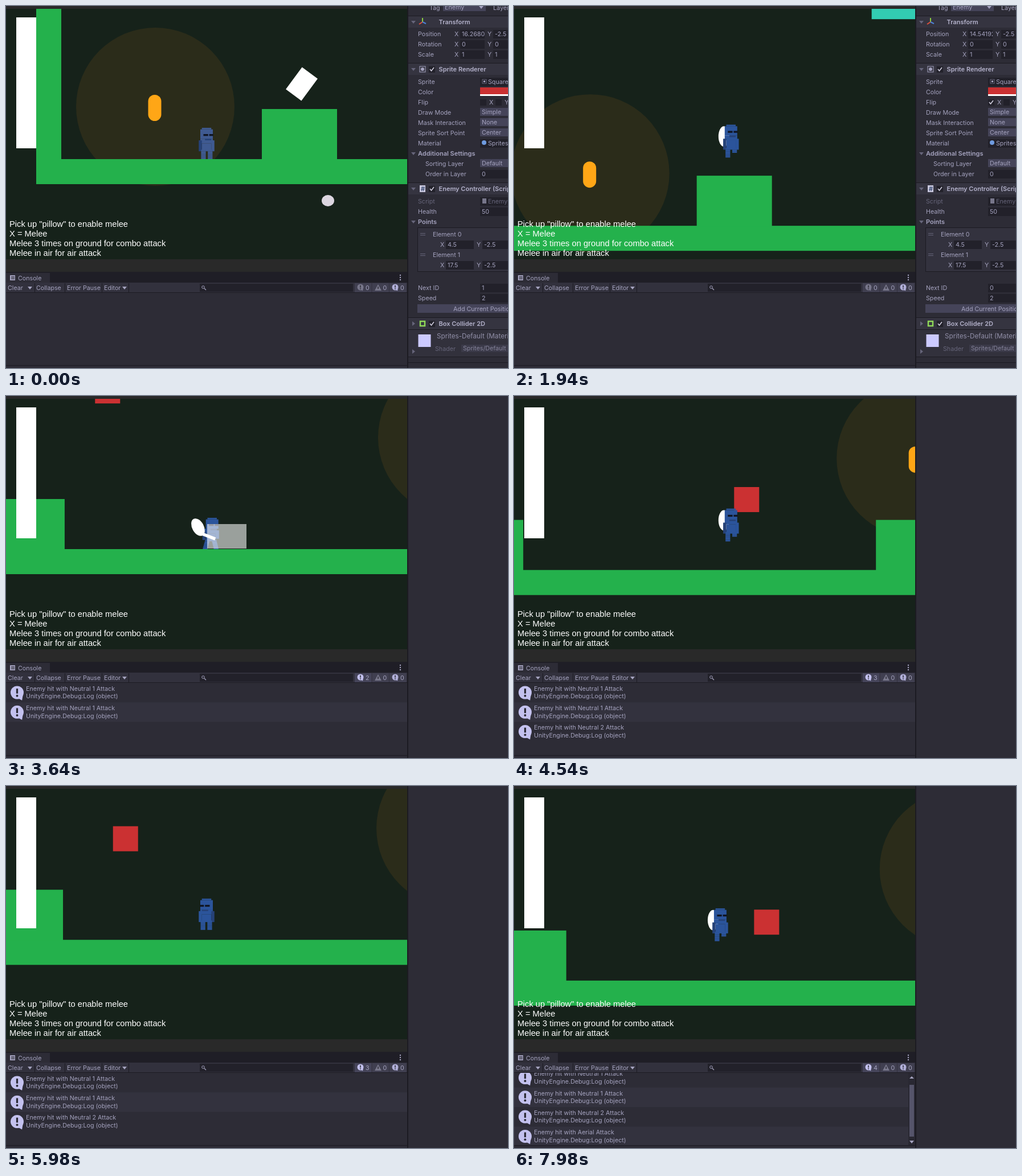
An HTML page with a canvas for the animation above (8000 ms loop, 881x636 px).

```html
<!DOCTYPE html>
<html lang="en">
<head>
<meta charset="utf-8">
<title>Melee test scene</title>
<style>
html, body { margin: 0; width: 100%; height: 100%; overflow: hidden; background: #2d2c36; }
canvas { display: block; }
</style>
</head>
<body>
<canvas id="stage" width="881" height="636"></canvas>
<script>
const ctx = document.getElementById('stage').getContext('2d');
const LOOP = 8000, UNIT = 44, PIXEL = 2.75;
const UI = '10.7px Inter, sans-serif', UI_BOLD = '600 11px Inter, sans-serif';
const PANEL = '#2d2c36', EDGE = '#1c1b22', FIELD = '#22212a', BUTTON = '#454459';
const LABEL = '#a5a3bf', DIM = '#66657a', LIGHT = '#c3c1ee', GREEN = '#24b14c', RED = '#cb3132';

const RUN_SPEED = 0.32, LAG_X = 90, LAG_Y = 40;
const runs = [
  { from: 1450, to: 2944, dir: 1 }, { from: 4180, to: 4830, dir: 1 }, { from: 5125, to: 5766, dir: -1 },
  { from: 6795, to: 6905, dir: 1 }, { from: 7200, to: 7284, dir: -1 }, { from: 7950, to: 8000, dir: 1 },
];
const jumps = [{ start: 1437, height: 122 }, { start: 4406, height: 122 }, { start: 5938, height: 122 }, { start: 7374, height: 77 }];
const hits = [{ time: 3250, name: 'Neutral 1' }, { time: 3600, name: 'Neutral 1' }, { time: 3920, name: 'Neutral 2' }, { time: 6920, name: 'Aerial' }];
const TURN = 534, PICKUP = 1880, DEATH = 3600;

const clamp = (v, lo, hi) => Math.min(hi, Math.max(lo, v));
const travelled = t => runs.reduce((sum, r) => sum + r.dir * RUN_SPEED * clamp(t - r.from, 0, r.to - r.from), 0);
const altitude = t => jumps.reduce((sum, j) => {
  const u = clamp((t - j.start) / (105 * Math.sqrt(j.height)), 0, 1);
  return sum + 4 * j.height * u * (1 - u);
}, 0);
const enemyX = t => 17.32075 - 1.975 * Math.abs(t - TURN) / 1000;
// The hanging box sweeps back and forth at a constant angular speed.
function swingAngle(t) {
  const phase = (1.561 * t / 1000 + 2.3) % 4;
  return 88 * (Math.abs(phase - 2) - 1) * Math.PI / 180;
}

function rect(x, y, w, h, color) {
  ctx.fillStyle = color;
  ctx.fillRect(x, y, w, h);
}
function ellipse(x, y, rx, ry, color, angle = 0) {
  ctx.fillStyle = color;
  ctx.beginPath();
  ctx.ellipse(x, y, rx, ry, angle, 0, 7);
  ctx.fill();
}
const disc = (x, y, r, color) => ellipse(x, y, r, r, color);
function poly(points, color) {
  ctx.fillStyle = color;
  ctx.beginPath();
  points.forEach(p => ctx.lineTo(p[0], p[1]));
  ctx.fill();
}
function line(points, color, width = 1) {
  ctx.strokeStyle = color;
  ctx.lineWidth = width;
  ctx.beginPath();
  points.forEach(p => ctx.lineTo(p[0], p[1]));
  ctx.stroke();
}
function arc(x, y, r, end, color, width = 1) {
  ctx.strokeStyle = color;
  ctx.lineWidth = width;
  ctx.beginPath();
  ctx.arc(x, y, r, 0, end);
  ctx.stroke();
}
function outline(x, y, size, color, width = 1) {
  ctx.strokeStyle = color;
  ctx.lineWidth = width;
  ctx.strokeRect(x, y, size, size);
}
function text(s, x, y, color = LABEL, font = UI) {
  ctx.font = font;
  ctx.fillStyle = color;
  ctx.textBaseline = 'middle';
  ctx.fillText(s, x, y + 0.5);
}
function clipped(x, y, w, h, draw) {
  ctx.save();
  ctx.beginPath();
  ctx.rect(x, y, w, h);
  ctx.clip();
  draw();
  ctx.restore();
}
const arrowDown = (x, y, color = LABEL) => poly([[x - 4, y - 2], [x + 4, y - 2], [x, y + 3]], color);
const arrowRight = (x, y, color) => poly([[x - 2, y - 4], [x + 3, y], [x - 2, y + 4]], color);

// Drawn in sprite pixels with the origin between the feet, facing right.
function drawBody(color, lean, stride, airborne) {
  const dark = '#264278', eye = '#101522', top = airborne ? -21 : -20;
  rect(lean - 3, top, 6, 1, color);
  rect(lean - 4, top + 1, 8, 6, color);
  rect(lean - 2, top + 4, 3, 1.2, eye);
  rect(lean + 1.7, top + 4, 2.6, 1.2, eye);
  rect(-4, top + 7, 8, 3, color);
  rect(-3, top + 10, 6, -top - 15, color);
  rect(lean - 1, top + 7, 4, 1, dark);
  rect(-5 - stride / 2, -12, 2, 7 - 2 * stride, dark);
  rect(3, -12, 2 + stride, 7 - 4 * stride, color);
  for (let row = 0; row < 6; row++) {
    rect(-3.5 - stride * row * 0.7, row - 6, 3, 1, color);
    if (row < 3 || !airborne) rect(0.8 + stride * row * 0.6, row - 6, 3, 1, color);
  }
}

function drawPlayer(t, x, feet, airborne) {
  const attacking = hits.some(h => Math.abs(t - h.time - 15) < 100);
  const running = !airborne && runs.some(r => t > r.from && t < r.to);
  const lastRun = runs.filter(r => t >= r.from).pop();
  const stride = running ? Math.abs(Math.cos(t * Math.PI / 370)) : attacking ? 0.4 : 0;
  if (attacking) airborne ? feet -= 16 : x += 7;

  const inSprite = draw => {
    ctx.save();
    ctx.translate(x, feet);
    ctx.scale(lastRun ? PIXEL * lastRun.dir : PIXEL, PIXEL);
    draw();
    ctx.restore();
  };
  inSprite(() => {
    if (airborne && !attacking && t > PICKUP) ellipse(-4.5, -13.5, 3.5, 6.5, '#fff');
    if (airborne && attacking) ctx.translate(0, 3);
    drawBody(lastRun ? '#2b549b' : '#3f5a91', running || attacking ? 1 : 0, stride, airborne);
    if (attacking && !airborne) {
      ellipse(-8, -14, 3.7, 6, '#fff', -0.5);
      line([[-6, -10], [3, -6.5]], '#fff', 2);
    }
  });
  if (!attacking) return;
  const hitbox = airborne ? [x + 2, feet - 47, 72, 77] : [x - 6, feet - 44, 69, 43];
  rect(...hitbox, 'rgba(255,255,255,.57)');
  if (airborne) inSprite(() => arc(7.2, -5, 4.6, Math.PI * 0.95, '#fff', 3.5));
}

function drawLamp(x, y) {
  disc(x + 1, y - 2, 139, '#2b2c1a');
  ctx.fillStyle = '#ffa616';
  ctx.beginPath();
  ctx.roundRect(x - 11.5, y - 23, 23, 46, 11.5);
  ctx.fill();
}

function drawGame(t) {
  const cameraX = travelled(t - LAG_X), blockX = 449 - cameraX, center = blockX + 66;
  const groundY = 269 + altitude(t - LAG_Y);
  rect(0, 5, 704, 440, '#16221a');
  drawLamp(blockX - 188, groundY - 90);
  drawLamp(blockX + 820, groundY - 194);
  rect(blockX - 396, groundY, 3000, UNIT, GREEN);
  rect(blockX - 396, groundY - 600, UNIT, 601, GREEN);
  rect(blockX, groundY - 88, 132, 89, GREEN);
  rect(blockX + 751, groundY - 88, 132, 89, GREEN);
  rect(blockX + 307, groundY - 407, 129, UNIT, '#32ccb2');

  if (t < PICKUP) {
    ctx.save();
    ctx.translate(blockX + 70, groundY - 138.8 + 6.8 * Math.cos(t / 2700 * 2 * Math.PI));
    ctx.rotate(0.637);
    rect(-17, -24, 34, 48, '#fff');
    ctx.restore();
  }
  if (t < DEATH) rect(center + (enemyX(t) - 2.8) * UNIT - 22, groundY - UNIT, UNIT, UNIT, RED);
  const angle = swingAngle(t);
  rect(center + 322 - 203 * Math.sin(angle), groundY - 312 + 201 * Math.cos(angle), UNIT, UNIT, RED);

  const height = altitude(t);
  drawPlayer(t, 352 + travelled(t) - cameraX, groundY - height, height > 20);
  if (t < 400) ellipse(565, 342, 11, 10, '#dcd6e0');

  rect(18, 20, 35, 230, '#fff');
  ['Pick up "pillow" to enable melee', 'X = Melee', 'Melee 3 times on ground for combo attack', 'Melee in air for air attack']
    .forEach((s, i) => text(s, 6, 383 + i * 17, '#fff', '14.7px "Liberation Sans", Arial, sans-serif'));
}

function bubble(x, y, r, color, mark) {
  disc(x, y, r, color);
  poly([[x, y + r * 0.8], [x + r * 0.9, y + r * 0.3], [x + r * 0.75, y + r * 1.2]], color);
  rect(x - r * 0.14, y - r * 0.6, r * 0.28, r * 0.75, mark);
  disc(x, y + r * 0.5, r * 0.17, mark);
}

function drawConsole(t) {
  const shown = hits.filter(h => t >= h.time), active = shown.length > 0, overflow = shown.length > 3;
  rect(0, 467, 704, 169, PANEL);
  clipped(0, 504, 704, 128, () => shown.forEach(({ name }, i) => {
    const y = 504 + i * 34.3 - (overflow ? 8.5 : 0);
    if (i % 2) rect(0, y, 704, 34.3, '#33323e');
    bubble(19.5, y + 17, 11.5, LIGHT, '#2b2a34');
    text(`Enemy hit with ${name} Attack`, 35, y + 10);
    text('UnityEngine.Debug:Log (object)', 35, y + 23.5);
  }));
  if (overflow) {
    rect(692, 504, 12, 128, '#292832');
    rect(694, 525, 8, 91, '#55546a');
    poly([[694, 514], [702, 514], [698, 510]], LABEL);
    arrowDown(698, 625);
  }

  rect(0, 467, 704, 19, '#1f1e26');
  rect(0, 469, 77, 18, PANEL);
  rect(7, 473, 9, 9, LABEL);
  for (let y = 475; y < 481; y += 2) rect(9, y, 6, 1, PANEL);
  text('Console', 21, 478);
  for (let y = 473; y < 482; y += 4) disc(692, y, 1.2, LABEL);
  rect(0, 486, 704, 18, '#32313d');
  text('Clear', 3, 495);
  arrowDown(42, 495);
  text('Collapse', 53, 495);
  text('Error Pause', 107, 495);
  text('Editor', 172, 495);
  arrowDown(208, 495);
  [50, 103, 168, 215].forEach(x => rect(x, 487, 1, 16, EDGE));
  rect(340, 488, 269, 14, FIELD);
  arc(346, 494, 2.3, 7, LABEL);
  line([[348, 496], [351, 499]], LABEL, 1.3);

  [shown.length, 0, 0].forEach((count, i) => {
    rect(612 + i * 30.5, 487, 29.5, 16, count ? BUTTON : '#403f50');
    text(count, 631 + i * 30.5, 495);
  });
  bubble(622, 494, 5.5, active ? LIGHT : '#77768a', PANEL);
  poly([[647, 500], [659, 500], [653, 489]], '#77768a');
  rect(652.3, 493, 1.5, 4, PANEL);
  bubble(683, 494, 5.5, '#b0aed8', PANEL);
  rect(0, 503, 704, 1, EDGE);
  rect(0, 631, 704, 1, EDGE);
}

function check(x, y, on) {
  rect(x, y - 5, 11, 11, FIELD);
  if (on) line([[x + 2, y], [x + 4.5, y + 3], [x + 9, y - 3]], '#d0cede', 1.6);
}
function field(x, y, value = '', width = 60, color = LABEL) {
  clipped(x, y - 7, width, 15, () => {
    rect(x, y - 7, width, 15, FIELD);
    text(value, x + 3, y, color);
  });
}
function dropdown(y, value) {
  rect(832, y - 7, 49, 14, BUTTON);
  text(value, 835, y);
}
function header(y, title, folded) {
  rect(706, y - 10, 175, 20, '#353440');
  rect(706, y - 11, 175, 1, EDGE);
  folded ? arrowRight(715, y, DIM) : arrowDown(715, y, DIM);
  text(title, 759.5, y, '#b4b2cb', UI_BOLD);
}
function vector(y, x, gap, first, second) {
  text('X', x, y);
  field(x + 10, y, first, gap - 15);
  text('Y', x + gap, y);
  field(x + gap + 10, y, second);
}

function drawInspector(t) {
  const returning = t >= TURN;
  text('Tag', 743, 3);
  rect(767, -5, 75, 14, BUTTON);
  text('Enemy', 770, 2);
  arrowDown(834, 2);
  text('Layer', 855, 3);

  header(28, 'Transform');
  line([[731, 28], [731, 21]], '#8bd03f', 2);
  line([[731, 28], [725, 32]], '#e0523f', 2);
  line([[731, 28], [737, 31]], '#4c83d8', 2);
  [['Position', enemyX(t).toFixed(5), '-2.5'], ['Rotation', '0', '0'], ['Scale', '1', '1']].forEach(([name, x, y], i) => {
    text(name, 723, 49 + i * 18);
    vector(49 + i * 18, 787, 58, x, y);
  });

  header(111, 'Sprite Renderer');
  outline(726, 106, 10, LABEL);
  disc(731, 111, 3, LABEL);
  check(742, 111, true);
  ['Sprite', 'Color', 'Flip', 'Draw Mode', 'Mask Interaction', 'Sprite Sort Point', 'Material']
    .forEach((s, i) => text(s, 723, 133 + i * 18));
  field(832, 133);
  outline(836, 129, 7, DIM);
  disc(839.5, 132.5, 1.7, LABEL);
  text('Square', 846, 133);
  rect(832, 143, 49, 12, RED);
  rect(832, 155, 49, 3, '#fff');
  check(832, 169, returning);
  text('X', 848, 169);
  check(859, 169, false);
  text('Y', 875, 169);
  ['Simple', 'None', 'Center'].forEach((s, i) => dropdown(186 + i * 18, s));
  field(832, 241);
  disc(839, 240, 4, '#6f9be0');
  text('Sprites-Default', 846, 241);
  arrowDown(715, 259, DIM);
  text('Additional Settings', 723, 259, LABEL, UI_BOLD);
  text('Sorting Layer', 736, 277);
  dropdown(276, 'Default');
  text('Order in Layer', 736, 295);
  field(832, 295, '0');

  header(321, 'Enemy Controller (Script)');
  rect(726, 315, 10, 12, '#c7c6dc');
  text('#', 728, 321, '#34466e', UI_BOLD);
  check(742, 321, true);
  text('Script', 723, 343, DIM);
  field(832, 343);
  rect(836, 338, 7, 9, '#77768a');
  text('EnemyController', 846, 343, DIM);
  text('Health', 723, 361);
  field(832, 361, t < hits[0].time ? '50' : '25');
  arrowDown(715, 379, DIM);
  text('Points', 723, 379, LABEL, UI_BOLD);
  rect(722, 389, 159, 78, EDGE);
  rect(723, 390, 158, 76, '#33323e');
  ['4.5', '17.5'].forEach((value, i) => {
    const y = 401 + i * 36;
    rect(727, y - 2, 9, 1, DIM);
    rect(727, y + 1, 9, 1, DIM);
    text('Element ' + i, 749, y);
    vector(y + 18, 762, 64, value, '-2.5');
  });
  text('Next ID', 723, 495);
  field(832, 495, returning ? '0' : '1');
  text('Speed', 723, 513);
  field(832, 513, '2');
  rect(722, 524, 159, 15, BUTTON);
  text('Add Current Position', 785, 532);

  header(558, 'Box Collider 2D', true);
  outline(727, 554, 8, '#8fd858', 2.5);
  check(742, 558, true);
  rect(706, 568, 175, 48, '#32313c');
  rect(723.5, 577, 22, 22, '#cccaff');
  text('Sprites-Default (Material)', 756, 580, '#918fa8', '11.7px Inter, sans-serif');
  text('Shader', 753, 602, DIM);
  rect(799, 595, 82, 13, '#3b3a49');
  text('Sprites/Default', 802, 601, '#86849b');
  arrowRight(715, 607, DIM);
  [568, 616, 626].forEach(y => rect(706, y, 175, 1, EDGE));
}

function frame(now) {
  const t = now % LOOP;
  rect(0, 0, 881, 636, PANEL);
  rect(0, 0, 704, 467, '#292929');
  clipped(0, 5, 704, 440, () => drawGame(t));
  drawConsole(t);
  rect(704, 0, 2, 636, EDGE);
  if (t < DEATH) clipped(706, 0, 175, 636, () => drawInspector(t));
  requestAnimationFrame(frame);
}
requestAnimationFrame(frame);
</script>
</body>
</html>
```
